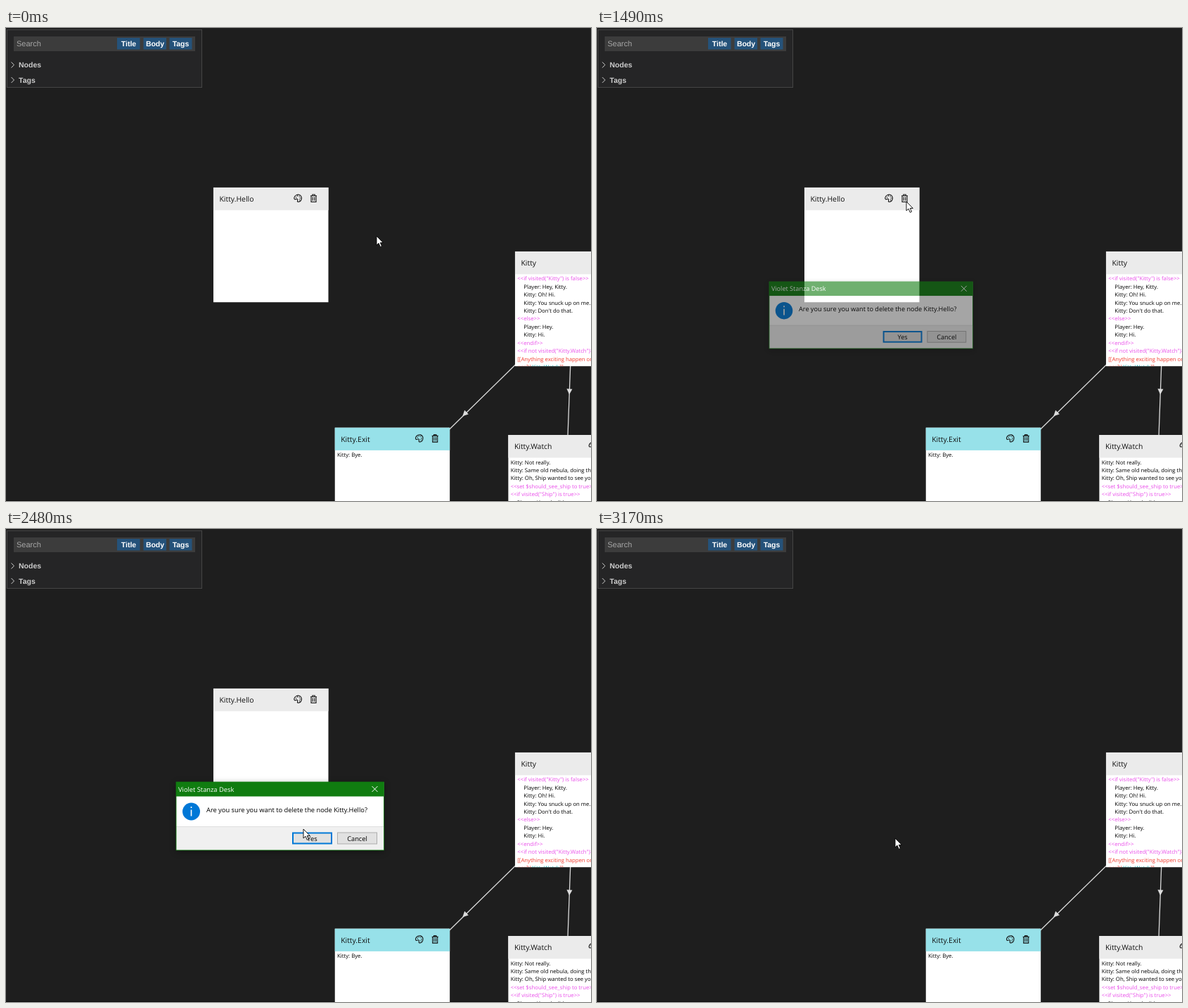
Write an HTML page that moves like this. It is 832 px wide and 673 px high and loops after 3.55 s.

```html
<!DOCTYPE html>
<html lang="en">
<head>
<meta charset="utf-8">
<title>Delete a node</title>
<style>
  html, body { margin: 0; width: 100%; height: 100%; overflow: hidden; background: #1e1e1e; }
  #stage { display: block; text-rendering: geometricPrecision; font-family: "Open Sans", "Noto Sans", sans-serif; }
  .panel { font: bold 10.5px "Liberation Sans", Arial, sans-serif; fill: #ccc; }
  .title { font-size: 10.4px; fill: #111; }
  .body { font-size: 7.75px; fill: #000; }
  .body .command { fill: #e94fe9; }
  .body .option { fill: #f03a2c; }
  .body .link { fill: #14b4ba; }
  .dialog { font-size: 9.3px; fill: #000; filter: drop-shadow(0 2px 4px rgba(0, 0, 0, .35)); }
  .icon { fill: none; stroke: #111; stroke-width: 1.1; }
  .mid { text-anchor: middle; }
</style>
</head>
<body>
<svg id="stage" width="832" height="673" viewBox="0 0 832 673">
  <defs>
    <g id="trash" class="icon">
      <path d="M-4.5-3.5h9M-1.7-3.7v-1.6h3.4v1.6M-3.5-3.2v8.4h7v-8.4M-1.3-1.8v5.2M1.3-1.8v5.2"/>
    </g>
    <g id="palette" class="icon">
      <path d="M1 5.2C-1 5.6-.8 3.8-.4 2.6C0 1-1.6.7-2.8 1.4C-4.6 2.4-5.6 1-5.2-.8C-4.4-4-1-5.4 1.8-4.8C4.6-4 5.8-1.2 5 1.4C4.4 3.8 3 5 1 5.2Z"/>
      <path d="M-3-1.4h1M-1-3.2h1M1.6-2.6h1M2.6 0h1M1.8 2.4h1" stroke-width="1.5"/>
    </g>
    <path id="arrowhead" d="M0 4.5L-4-3.5H4Z" fill="#dcdcdc"/>
  </defs>

  <path d="M0 672.5h832" stroke="#0d0d0d"/>

  <g class="panel">
    <rect x="1.5" y="2.5" width="277" height="82" fill="#252526" stroke="#454545"/>
    <rect x="11" y="12" width="258" height="21" fill="#3c3c3c"/>
    <text x="15" y="26" font-weight="normal" style="font-size:11px" fill="#a6a6a6">Search</text>
    <path d="M158 14h32.500v16.500h-32.500zM195.500 14h32.500v16.500h-32.500zM232.500 14h32v16.500h-32z" fill="#25527a"/>
    <g class="mid" fill="#fff">
      <text x="174.500" y="26">Title</text>
      <text x="212" y="26">Body</text>
      <text x="248.500" y="26">Tags</text>
    </g>
    <path d="M7.500 48.500l4 4-4 4M7.500 70l4 4-4 4" fill="none" stroke="#ccc"/>
    <text x="18" y="56">Nodes</text>
    <text x="18" y="77.500">Tags</text>
  </g>

  <path d="M805.7 399.5L549.5 650.5M805.7 399.5L796 661" stroke="#dcdcdc" stroke-width="1.3"/>
  <use href="#arrowhead" transform="translate(652.5 549) rotate(45.6)"/>
  <use href="#arrowhead" transform="translate(801.3 517) rotate(2)"/>

  <g id="nodes"></g>

  <g id="dialog" class="dialog">
    <rect x="242" y="360" width="295.5" height="97" fill="#fff"/>
    <path d="M242 424h295.5v33h-295.5z" fill="#f0f0f0"/>
    <path d="M242 423.5h295.5" stroke="#dfdfdf"/>
    <rect x="242" y="360" width="295.5" height="20.5" fill="#107c10"/>
    <rect x="242" y="360" width="295.5" height="97" fill="none" stroke="#107c10" stroke-width=".8"/>
    <text x="245" y="373.5" fill="#fff">Violet Stanza Desk</text>
    <path d="M520.5 366l8 8m0-8l-8 8" stroke="#fff"/>
    <circle cx="263.5" cy="402" r="12.5" fill="#0078d7"/>
    <path d="M263.5 399.5v9M263.5 395v2" stroke="#fff" stroke-width="1.6"/>
    <text x="285" y="402.7">Are you sure you want to delete the node Kitty.Hello?</text>
    <rect id="yes" stroke="#0078d7"/>
    <rect x="471.5" y="432" width="56" height="16" fill="#e1e1e1" stroke="#adadad"/>
    <text class="mid" x="435.5" y="443.5">Yes</text>
    <text class="mid" x="499.5" y="443.5">Cancel</text>
  </g>

  <g id="cursor">
    <circle id="press" cy="1" r="10" fill="#f2ee3c" opacity=".75"/>
    <g fill="#fff" stroke="#000" stroke-linejoin="round">
      <path id="arrow" d="M0 0V13l3-2.8 2.3 5.2 2.2-1-2.2-4.9h4z" stroke-width=".9"/>
      <path id="hand" d="M-2 12V1.8q1.3-2 2.6 0V7q1.8-1.2 2.5.5 1.8-1 2.4.8 2-.6 2.2 1V14q-.2 2-1.5 3.5V19h-7.5v-1.5L-5.8 12q-.5-2.2 1.5-1.8z"/>
    </g>
  </g>
</svg>
<script>
const LOOP = 3550;
const byId = id => document.getElementById(id);
const escape = s => s.replace(/</g, '&lt;').replace(/>/g, '&gt;');

// A leading tab indents a line; "|" and "]]" delimit a link target.
function bodyLine(line, i) {
  const indent = line.startsWith('\t') ? 9 : 0;
  const kind = line.startsWith('<<') ? 'command' : /^\[\[|\]\]$/.test(line) ? 'option' : '';
  const text = escape(line.trim()).replace(/\|(.+)\]\]/, '|<tspan class="link">$1</tspan>]]');
  return `<text class="${kind}" x="${3.5 + indent}" y="${41.5 + i * 11.43}">${text}</text>`;
}

function node(id, x, y, title, lines, header = '#ebebeb') {
  return `<svg id="${id}" x="${x}" y="${y}" width="163.8" height="163.5">
    <rect width="164" height="164" fill="#fff"/>
    <rect width="164" height="32.5" fill="${header}"/>
    <text class="title" x="8.7" y="20.3">${title}</text>
    <use href="#palette" x="120.3" y="15.3"/><use href="#trash" x="142.7" y="15.5"/>
    <g class="body">${lines.map(bodyLine).join('')}</g></svg>`;
}

byId('nodes').innerHTML =
  node('hello', 294.8, 226.8, 'Kitty.Hello', []) +
  node('start', 723.8, 317.8, 'Kitty', [
    '<<if visited("Kitty") is false>>', '\tPlayer: Hey, Kitty.', '\tKitty: Oh! Hi.',
    '\tKitty: You snuck up on me.', "\tKitty: Don't do that.", '<<else>>', '\tPlayer: Hey.',
    '\tKitty: Hi.', '<<endif>>', '<<if not visited("Kitty.Watch")>>',
    '[[Anything exciting happen on', 'nce?|Kitty.Watch]]']) +
  node('exit', 467.5, 568.4, 'Kitty.Exit', ['Kitty: Bye.'], '#97e1e9') +
  node('watch', 714.2, 579, 'Kitty.Watch', [
    'Kitty: Not really.', 'Kitty: Same old nebula, doing the', 'Kitty: Oh, Ship wanted to see you.',
    '<<set $should_see_ship to true>>', '<<if visited("Ship") is true>>', '\tPlayer: Already did.']);

const linear = p => p, easeIn = p => p * p, easeOut = p => p * (2 - p);
const smooth = p => p * p * (3 - 2 * p);

// Pointer moves: first and last step time, step count, destination, easing.
const moves = [
  [150, 610, 7, 445, 250, smooth],
  [690, 690, 1, 443, 250, linear],
  [840, 920, 2, 440, 247, linear],
  [1560, 1790, 4, 426, 291, easeIn],
  [1860, 2090, 4, 419, 363, linear],
  [2170, 2320, 3, 421, 403, linear],
  [2400, 2710, 5, 424, 440, easeOut]
];

function pointerAt(t) {
  let x = 527, y = 296;
  for (const [first, last, steps, toX, toY, ease] of moves) {
    if (t < first) break;
    const interval = (last - first) / (steps - 1 || 1);
    const step = t >= last ? steps : Math.floor((t - first + 4) / interval) + 1;
    const p = ease(Math.min(1, step / steps));
    x += (toX - x) * p;
    y += (toY - y) * p;
  }
  return [Math.round(x), Math.round(y)];
}

function dialogOpacity(t) {
  if (t < 1490 || t >= 3090) return 0;
  if (t >= 3020) return 0.6;
  return t >= 1790 ? 1 : 1 - 0.4 * 0.3 ** Math.floor((t - 1490) / 70);
}

const between = (t, a, b) => t >= a && t < b;
const show = (id, visible) => byId(id).style.display = visible ? '' : 'none';

function setAttributes(id, values) {
  for (const key in values) byId(id).setAttribute(key, values[key]);
}

function draw(t) {
  const [x, y] = pointerAt(t);
  const onTrash = between(t, 610, 1490);
  setAttributes('cursor', { transform: `translate(${x} ${y})` });
  show('hand', onTrash);
  show('arrow', !onTrash);
  show('press', between(t, 1320, 1490) || between(t, 2940, 3020));

  const opacity = dialogOpacity(t);
  const scale = 1 - 0.05 * (1 - opacity);
  setAttributes('dialog', {
    opacity,
    transform: `translate(389.7 408.5) scale(${scale}) translate(-389.7 -408.5)`
  });
  const hover = y > 431 && t > 2400;
  const inset = hover ? 0.5 : 1;
  setAttributes('yes', {
    x: 407 + inset, y: 431.5 + inset, width: 57 - 2 * inset, height: 17 - 2 * inset,
    fill: hover ? '#e5f1fb' : '#e1e1e1', 'stroke-width': 2 * inset
  });

  byId('hello').style.opacity = t < 3090 ? 1 : t < 3170 ? 0.4 : 0;
}

const start = performance.now();
function tick() {
  draw((performance.now() - start) % LOOP);
  requestAnimationFrame(tick);
}
draw(0);
requestAnimationFrame(tick);
</script>
</body>
</html>
```
